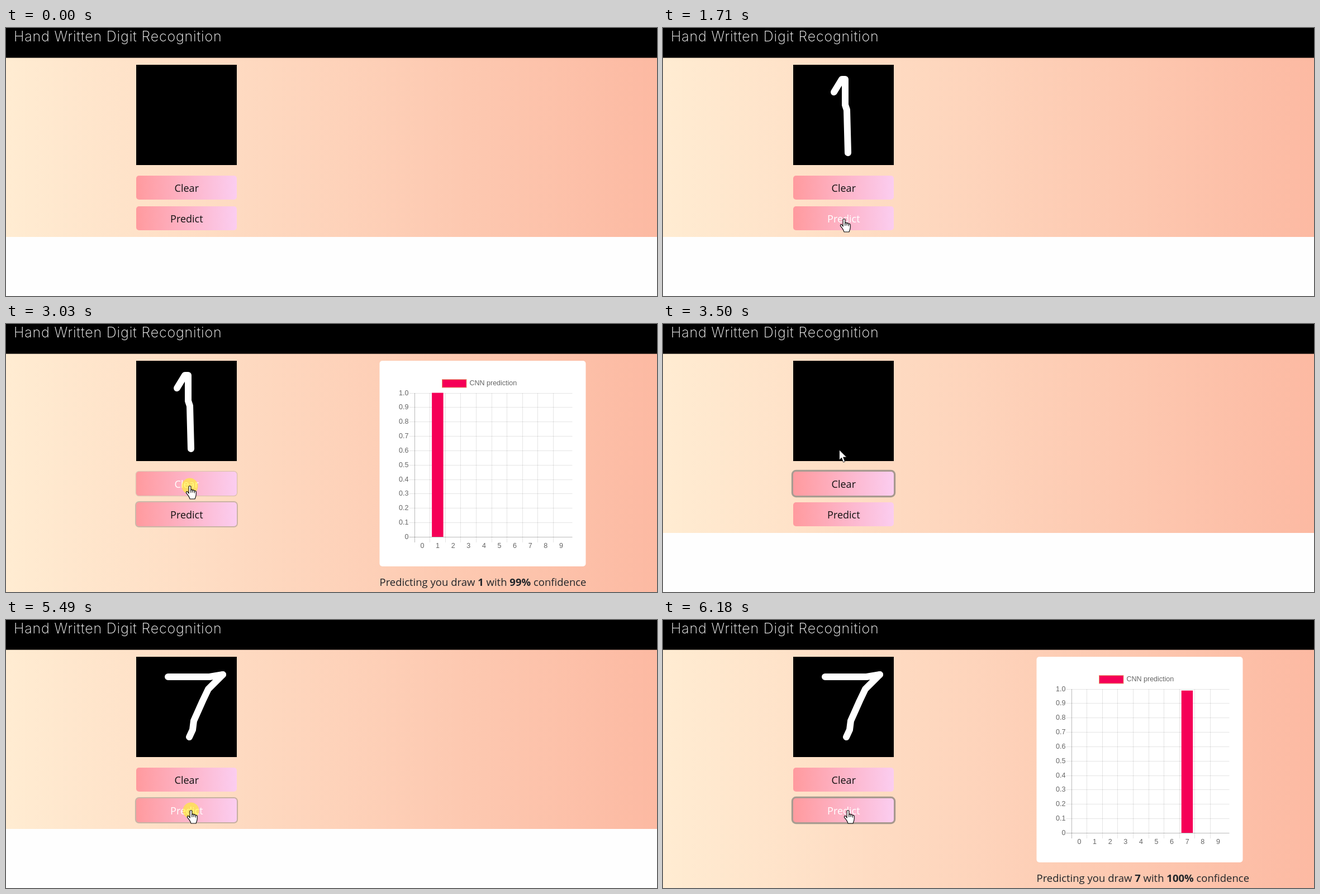
An HTML page that plays this animation: 1165 by 481 pixels, repeating every 6.26 s.

```html
<!DOCTYPE html>
<html lang="en">
<head>
<meta charset="utf-8">
<title>Hand Written Digit Recognition</title>
<style>
  html, body { margin: 0; width: 100%; height: 100%; overflow: hidden; background: #fefefe; }
  svg { display: block; width: 100%; height: 100%; }
  .title { font: 200 25px Inter, sans-serif; letter-spacing: .83px; fill: #fff; }
  .button { font: 18px "Open Sans", "Noto Sans", sans-serif; text-anchor: middle; }
  .result { font: 18.5px "Open Sans", "Noto Sans", sans-serif; fill: #212529; }
  .result .strong { font-weight: 700; }
  .chart { font: 12.5px "Liberation Sans", Arial, sans-serif; fill: #666; }
  .ring { fill: none; stroke: rgb(82, 88, 93); }
  .track { fill: none; stroke: none; }
  .ink { stroke: #fff; stroke-width: 12; stroke-linecap: round; stroke-linejoin: round; }
</style>
</head>
<body>
<svg viewBox="0 0 1165 481">
  <defs>
    <linearGradient id="peach" x2="1.07"><stop stop-color="#ffecd2"/><stop offset="1" stop-color="#fcb69f"/></linearGradient>
    <linearGradient id="pink"><stop stop-color="#ff9a9e"/><stop offset="1" stop-color="#fbcdf0"/></linearGradient>
  </defs>
  <rect id="backdrop" y="53" width="1165" height="322" fill="url(#peach)"/>
  <rect width="1165" height="53.5"/>
  <text class="title" x="14" y="23.5">Hand Written Digit Recognition</text>
  <rect x="233" y="66" width="180" height="180"/>
  <g id="tracks"></g>
  <g id="buttons"></g>
  <g id="panel">
    <rect x="668.5" y="66" width="369" height="369" rx="5" fill="#fff"/>
    <g id="chart" class="chart">
      <rect x="780.5" y="99.5" width="43.5" height="14.5" fill="#f50057" stroke="#e5a070"/>
      <text x="829.5" y="110">CNN prediction</text>
    </g>
    <rect id="bar" width="20.5" fill="#f50057"/>
    <text class="result" x="668.5" y="470">Predicting you draw <tspan id="digit" class="strong"></tspan> with <tspan id="percent" class="strong"></tspan> confidence</text>
  </g>
  <g id="pointer">
    <circle id="halo" r="14.5" fill="#ff0" fill-opacity=".5"/>
    <path id="arrow" d="M0 0V18L4 14 7 22 10 21 7 13H13Z" fill="#fff" stroke="#000" stroke-width=".8"/>
    <g id="hand" transform="translate(0 -1) scale(.94)" fill="#fff" stroke="#000" stroke-width="1.2" stroke-linejoin="round">
      <path d="M-2 2Q0-1 2 2V9Q4 6 5.4 9.4 7.5 7 8.8 10.4 11 9 12 12V16.5Q12 20 9.6 25.5H0Q-1 21-7 14-7 10-4 12L-2 15Z"/>
      <path d="M2 8.5v5M5.4 9.4v4M8.8 10.4v4" fill="none"/>
    </g>
  </g>
</svg>
<script>
const LOOP = 6260, CLICK = 120, FADE = 150, HOLD = 80, APPEAR = 70;
const PREDICT_ONE = 1746, CLEAR = 2972, PREDICT_SEVEN = 5393, CLEARED = CLEAR + CLICK;
const clicks = [PREDICT_ONE, CLEAR, PREDICT_SEVEN];
const $ = id => document.getElementById(id);

function add(parent, tag, attrs, text = "") {
  const node = document.createElementNS("http://www.w3.org/2000/svg", tag);
  for (const name in attrs) node.setAttribute(name, attrs[name]);
  node.textContent = text;
  return parent.appendChild(node);
}

function makeMove(start, end, d, inkUntil = 0) {
  const track = add($("tracks"), "path", { d, class: inkUntil ? "track ink" : "track" });
  return { start, end, inkUntil, track, length: track.getTotalLength() };
}

// The pointer rests at the end of each move until the next one starts.
const moves = [
  makeMove(APPEAR, 380, "M368 164 306 115"),
  makeMove(380, 1310, "M306 115 320 92H326V138L329 147 331 224", CLEARED),
  makeMove(1400, 1650, "M331 224 324 343"),
  makeMove(2830, 2960, "M324 343 329 291"),
  makeMove(3300, 3810, "M329 291 290 102"),
  makeMove(4150, 4500, "M290 102H364L388 98", LOOP),
  makeMove(4500, 5000, "M388 98 362 124 352 145 336 181 334 197 328 210", LOOP),
  makeMove(5080, 5300, "M328 210 331 342")
];

function makeButton(label, y) {
  const box = { x: 233, y, width: 180, height: 43, rx: 5 };
  const ring = add($("buttons"), "rect", { ...box, class: "ring" });
  add($("buttons"), "rect", { ...box, fill: "url(#pink)" });
  const text = add($("buttons"), "text", { x: 323.3, y: y + 29.3, class: "button" }, label);
  return { y, ring, text };
}
const clear = makeButton("Clear", 265), predict = makeButton("Predict", 320);

const columnX = i => 731.5 + 27.6 * i;
const barHeight = value => 258.5 * value;
for (let i = 0; i <= 10; i++) {
  const y = Math.round(382 - barHeight(i / 10)) + .5, x = Math.round(columnX(i)) - .5;
  const stroke = `rgba(0,0,0,${i ? .1 : .27})`;
  add($("chart"), "path", { d: `M721.5 ${y}H1013.5`, stroke });
  add($("chart"), "text", { x: 720.5, y: y + 3.5, "text-anchor": "end" }, i ? (i / 10).toFixed(1) : "0");
  if (i < 10) {
    add($("chart"), "path", { d: `M${x} 124V392`, stroke });
    add($("chart"), "text", { x: columnX(i) + 13.5, y: 402, "text-anchor": "middle" }, i);
  }
}

const clamp = v => Math.min(1, Math.max(0, v));
const smooth = k => k * k * (3 - 2 * k);
const show = (node, on) => node.setAttribute("display", on ? "inline" : "none");
const travelled = (move, t) => move.length * smooth(clamp((t - move.start) / (move.end - move.start)));

function pointerAt(t) {
  const move = moves.findLast(m => t >= m.start) || moves[0];
  return move.track.getPointAtLength(travelled(move, t));
}

function drawInk(t) {
  for (const move of moves.filter(m => m.inkUntil)) {
    show(move.track, t >= move.start && t < move.inkUntil);
    move.track.setAttribute("stroke-dasharray", `${travelled(move, t)} 999`);
  }
}

function drawButton(button, focus, hovered) {
  button.ring.setAttribute("stroke-width", 6.4 * focus);
  button.ring.setAttribute("stroke-opacity", .5 * focus);
  button.text.setAttribute("fill", hovered ? "#fff" : "#111");
}

function drawResult(t) {
  const first = t < CLEARED;
  const age = t - CLICK - (first ? PREDICT_ONE : PREDICT_SEVEN);
  const visible = age >= 0;
  show($("panel"), visible);
  $("backdrop").setAttribute("height", visible ? 428 : 322);
  const digit = first ? 1 : 7;
  const height = barHeight(1 - (1 - clamp(age / 1000)) ** 4);
  $("bar").setAttribute("x", columnX(digit) + 3);
  $("bar").setAttribute("y", 382 - height);
  $("bar").setAttribute("height", height);
  $("digit").textContent = digit;
  $("percent").textContent = first ? "99%" : "100%";
}

function drawPointer(t, { x, y }, onButton) {
  const drawing = moves.some(m => m.inkUntil && t >= m.start && t < m.end + HOLD);
  const clicking = clicks.some(start => t >= start && t < start + CLICK);
  $("pointer").setAttribute("transform", `translate(${x} ${y})`);
  show($("pointer"), t >= APPEAR);
  show($("halo"), drawing || clicking);
  show($("arrow"), !onButton);
  show($("hand"), onButton);
}

function render(t) {
  const pointer = pointerAt(t);
  const over = button => pointer.y >= button.y && pointer.y <= button.y + 43;
  const since = start => clamp((t - start) / FADE);
  drawInk(t);
  drawResult(t);
  drawButton(clear, since(CLEAR) - since(moves[5].start), over(clear));
  drawButton(predict, since(PREDICT_ONE) - since(CLEAR) + since(PREDICT_SEVEN), over(predict));
  drawPointer(t, pointer, over(clear) || over(predict));
}

const started = performance.now();
function tick() {
  render((performance.now() - started) % LOOP);
  requestAnimationFrame(tick);
}
tick();
</script>
</body>
</html>
```
